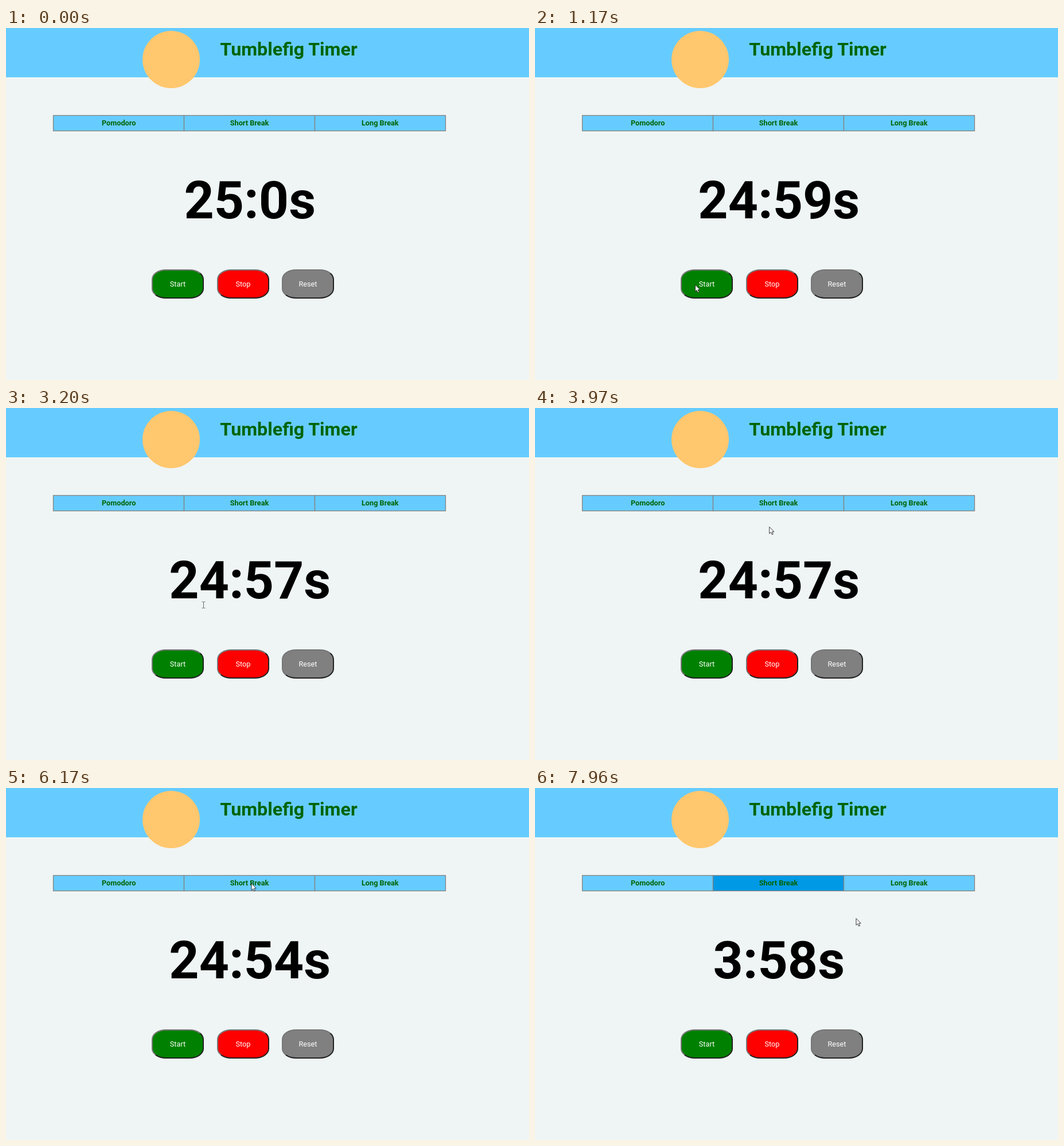
An HTML page for the animation above (8 s loop, 912 by 614 pixels).

```html
<!DOCTYPE html>
<html lang="en">
<head>
<meta charset="utf-8">
<title>Tumblefig Timer</title>
<style>
  html, body { margin: 0; width: 100%; height: 100%; overflow: hidden; background: #eff5f5; }
  body { font: 12.7px Roboto, sans-serif; }
  svg { position: absolute; left: 0; top: 0; }
  text { text-anchor: middle; }
  .bold { font-weight: 700; fill: #006400; }
  .tab { fill: #66ccff; stroke: #858280; stroke-width: 1.3; }
  .tab.active { fill: #0099e6; }
  .button {
    position: absolute; top: 421px; width: 91px; height: 51px; box-sizing: border-box;
    border: 2px solid; border-color: #767676 #222 #222 #767676; border-radius: 27%/34%;
    color: #fff; line-height: 47px; text-align: center;
  }
  .button.pressed { border-color: #222 #767676 #767676 #222; }
</style>
</head>
<body>
<svg width="912" height="614">
  <rect width="912" height="86" fill="#66ccff"/>
  <circle cx="288" cy="55" r="50" fill="#ffc76e"/>
  <text class="bold" x="373.3" y="48" style="font-size:32.2px;text-anchor:start">Tumblefig Timer</text>
  <g id="tabs"></g>
  <text id="clock" x="425.3" y="332.2" font-size="91.2" font-weight="700"></text>
</svg>
<div id="buttons"></div>
<svg width="912" height="614">
  <g id="cursor">
    <path id="arrow" d="M.5.5V12.3L3.2 9.8 5.1 14 7 13.2 5.2 9H8.8Z" fill="#fff" stroke="#222" stroke-width=".9"/>
    <path id="beam" d="M-2.5-5H-.5L.5-4.5 1.5-5H3.5M-2.5 6H-.5L.5 5.5 1.5 6H3.5M.5-4.5V5.5" fill="none" stroke="#666"/>
  </g>
</svg>

<script>
const LOOP = 8000, STEP = 77, SECOND = 1000;
const SHOWN = 310, PRESS = 1090, RUN = 1170, BREAK = 6480;

// Each glide carries the pointer on from where the last one left it
const entry = { x: 563, y: 498 };
const glides = [
  { from: 310, to: 538, x: 249, y: 486 },
  { from: 538, to: 690, x: 279, y: 447.5 },
  { from: 2273, to: 2740, x: 344, y: 343 },
  { from: 3203, to: 4200, x: 427.5, y: 166 },
  { from: 6483, to: 6560, x: 471, y: 239 },
  { from: 7183, to: 7650, x: 545, y: 239 },
  { from: 7723, to: 7960, x: 559.5, y: 227 }
];

const $ = id => document.getElementById(id);
const show = (id, on) => $(id).style.display = on ? "" : "none";
const mix = (a, b, k) => a + (b - a) * k;

$("tabs").innerHTML = ["Pomodoro", "Short Break", "Long Break"].map((name, i) => `
  <rect class="tab" x="${82.5 + 228 * i}" y="152.5" width="228" height="27"/>
  <text class="bold" x="${196.7 + 227.8 * i}" y="170">${name}</text>`).join("");
$("buttons").innerHTML = [["Start", "#008000"], ["Stop", "#ff0000"], ["Reset", "#808080"]].map(([name, color], i) =>
  `<div class="button" style="left:${Math.round(254 + 113.7 * i)}px;background:${color}">${name}</div>`).join("");

const shortTab = $("tabs").querySelectorAll("rect")[1];
const startButton = $("buttons").firstChild;

function pointer(t) {
  let { x, y } = entry;
  for (const g of glides) {
    if (t < g.from) break;
    // Glides advance in even, discrete steps
    const steps = Math.round((g.to - g.from) / STEP);
    const k = Math.min(1, Math.floor((t - g.from) / (g.to - g.from) * steps) / steps);
    x = mix(x, g.x, k);
    y = mix(y, g.y, k);
  }
  return { x, y };
}

function label(t) {
  if (t < RUN) return "25:0s";
  const [minutes, since] = t < BREAK ? [24, RUN] : [3, BREAK];
  return `${minutes}:${59 - Math.floor((t - since) / SECOND)}s`;
}

function draw(t) {
  const { x, y } = pointer(t);
  const overText = y > 248 && y < 355;
  $("clock").textContent = label(t);
  shortTab.classList.toggle("active", t >= BREAK);
  startButton.classList.toggle("pressed", t >= PRESS && t < RUN);
  $("cursor").setAttribute("transform", `translate(${x} ${y})`);
  show("cursor", t >= SHOWN);
  show("arrow", !overText);
  show("beam", overText);
}

const begin = performance.now();
function frame() {
  draw((performance.now() - begin) % LOOP);
  requestAnimationFrame(frame);
}
frame();
</script>
</body>
</html>
```
